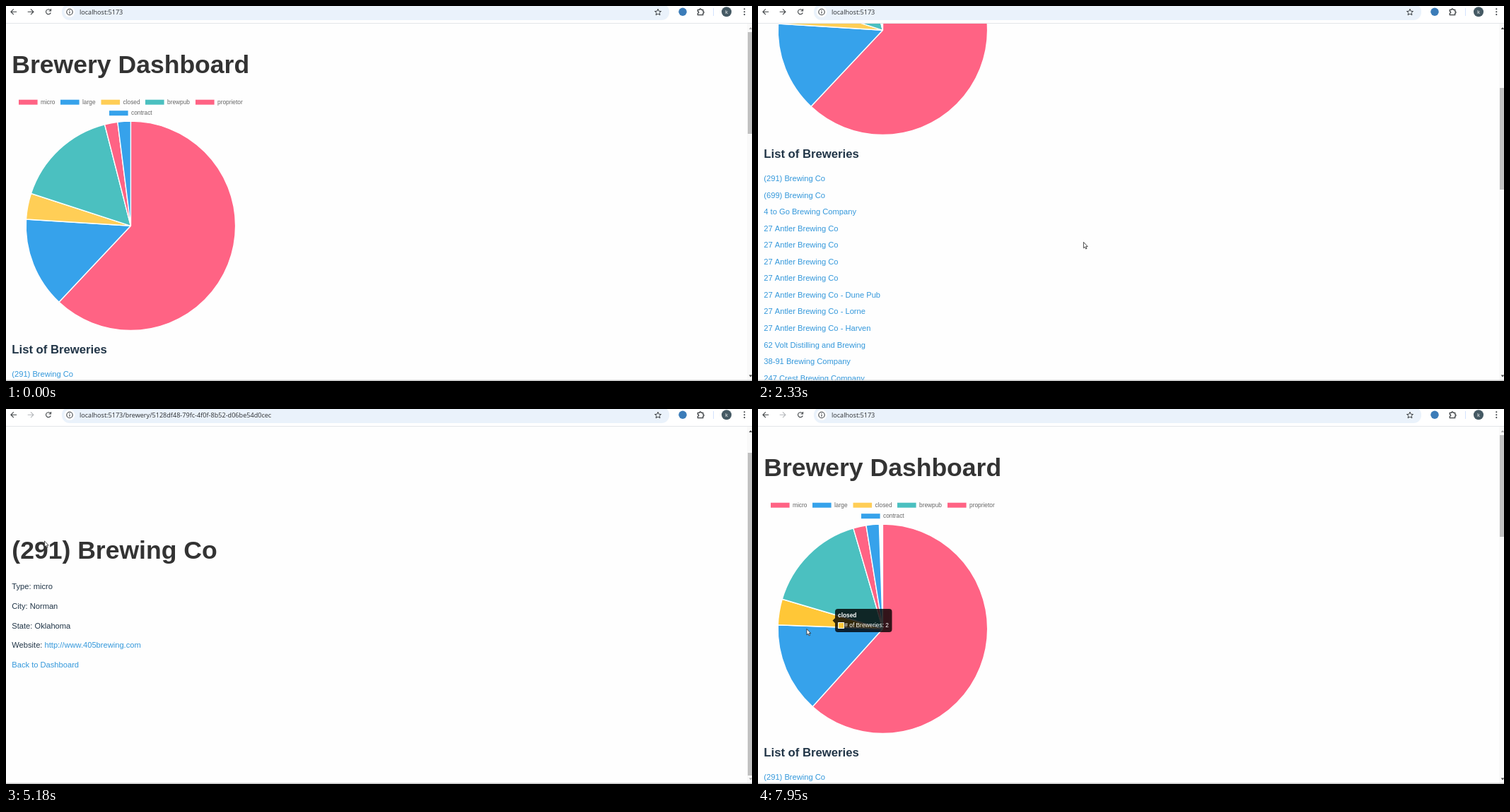
Animation, 1055 px wide and 531 px high, one loop 8000 ms. Source, as an HTML page with a canvas:

```html
<!DOCTYPE html>
<html lang="en">
<head>
<meta charset="utf-8">
<title>Brewery Dashboard</title>
<style>
html, body { margin: 0; width: 1055px; height: 531px; overflow: hidden; background: #fefefe; }
canvas { display: block; }
</style>
</head>
<body>
<canvas id="stage" width="1055" height="531"></canvas>
<script>
const ctx = document.getElementById('stage').getContext('2d');
const LOOP = 8000;
const SANS = '"Liberation Sans", Arial, sans-serif';
const UI = '"Open Sans", "Noto Sans", sans-serif';
const LEFT = 8.3, TITLE = 35.55, BODY = 11.15, ROW = 23.55;
const PINK = '#ff6384', BLUE = '#36a2eb', YELLOW = '#ffce56', TEAL = '#4bc0c0';
const INK = '#213547', LINK = '#3498db', HOVER = '#646cff';
const HOME = 'localhost:5173';
const DETAIL = HOME + '/brewery/5128df48-79fc-4f0f-8b52-d06be54d0cec';
const OPEN = 4390, BACK = 7200, CHART = 7222;

// label, count, colour, legend swatch x, legend row
const SLICES = [
  ['micro', 31, PINK, 18, 0], ['large', 7, BLUE, 77, 0], ['closed', 2, YELLOW, 134.5, 0],
  ['brewpub', 8, TEAL, 197, 0], ['proprietor', 1, PINK, 268, 0], ['contract', 1, BLUE, 146, 1]
];
const CHAIN = '27 Antler Brewing Co';
const BREWERIES = [
  '(291) Brewing Co', '(699) Brewing Co', '4 to Go Brewing Company',
  CHAIN, CHAIN, CHAIN, CHAIN,
  CHAIN + ' - Dune Pub', CHAIN + ' - Lorne', CHAIN + ' - Harven',
  '62 Volt Distilling and Brewing', '38-91 Brewing Company', '247 Crest Brewing Company',
  '386 Lane Brewing Co', '72X Brewing', '48th Artifact Brewing Company', '83 Hover Brewing Company'
];
// time, x, y of the pointer's hot spot
const PATH = [
  [640, 741, 442], [840, 460, 334], [3200, 460, 334], [3400, 300, 250], [3600, 95, 140],
  [3700, 72, 126], [3800, 70.5, 132.5], [5120, 70.5, 132.5], [5180, 54, 186], [5400, 60, 290],
  [5600, 66, 335], [5920, 71, 361], [5980, 71, 361], [6130, 77, 361], [6330, 68, 360],
  [6900, 68, 360], [6930, 71, 361], [7200, 71, 361], [7300, 71, 366], [7500, 71, 366], [7800, 68.5, 311]
];

const ramp = (t, a, b) => Math.min(1, Math.max(0, (t - a) / (b - a)));
const inOut = p => p < .5 ? 4 * p ** 3 : 1 - 4 * (1 - p) ** 3;
const outQuart = p => 1 - (1 - p) ** 4;

function pointer(t) {
  const i = PATH.findIndex(p => p[0] > t);
  if (i < 0) return PATH.at(-1).slice(1);
  const [a, b] = [PATH[i - 1], PATH[i]], p = ramp(t, a[0], b[0]);
  return [a[1] + (b[1] - a[1]) * p, a[2] + (b[2] - a[2]) * p];
}

function rect(x, y, w, h, color, radius = 0) {
  ctx.fillStyle = color;
  ctx.beginPath();
  ctx.roundRect(x, y, w, h, radius);
  ctx.fill();
}

function disc(x, y, r, color) {
  ctx.fillStyle = color;
  ctx.beginPath();
  ctx.arc(x, y, r, 0, 7);
  ctx.fill();
}

function text(str, x, y, size, color, family = SANS, weight = '') {
  ctx.font = `${weight} ${size}px ${family}`;
  ctx.fillStyle = color;
  ctx.fillText(str, x, y);
  return ctx.measureText(str).width;
}

function path(d, x, y, stroke, fill, width = 1.1) {
  ctx.save();
  ctx.translate(x, y);
  const shape = new Path2D(d);
  if (fill) { ctx.fillStyle = fill; ctx.fill(shape); }
  if (stroke) { ctx.strokeStyle = stroke; ctx.lineWidth = width; ctx.stroke(shape); }
  ctx.restore();
}

// Draws a link and tells whether the pointer is over it.
function link(str, x, y, mouse) {
  ctx.font = `${BODY}px ${SANS}`;
  const w = ctx.measureText(str).width;
  const over = !!mouse && mouse[0] > x && mouse[0] < x + w && mouse[1] > y - 10 && mouse[1] < y + 3;
  text(str, x, y, BODY, over ? HOVER : LINK);
  if (over) rect(x, y + 1, w, .8, HOVER);
  return over;
}

function pie(ease, grow, active) {
  const r = 148.2 + 15.8 * grow, cx = 176.4, cy = 459.5 - r;
  let from = -Math.PI / 2;
  ctx.strokeStyle = '#fff';
  ctx.lineWidth = 1.4;
  ctx.lineJoin = 'bevel';
  for (const [label, count, color] of SLICES) {
    const to = from + count / 50 * Math.PI * 2 * ease;
    ctx.fillStyle = label === active ? '#ffc737' : color;
    ctx.beginPath();
    ctx.moveTo(cx, cy);
    ctx.arc(cx, cy, r, from, to);
    ctx.closePath();
    ctx.fill();
    ctx.stroke();
    from = to;
  }
}

function tooltip(alpha) {
  ctx.globalAlpha = alpha;
  ctx.fillStyle = 'rgba(0,0,0,.8)';
  ctx.beginPath();
  ctx.roundRect(109, 283, 80.5, 33, 4);
  ctx.moveTo(109, 296);
  ctx.lineTo(105.5, 299.6);
  ctx.lineTo(109, 303.2);
  ctx.fill();
  text('closed', 113, 295, 8.36, '#fff', SANS, 'bold');
  rect(113, 302, 9, 9, '#fff');
  rect(114, 303, 7, 7, '#ffc737');
  text('# of Breweries: 2', 122.3, 309, 8.36, '#fff');
  ctx.globalAlpha = 1;
}

function dashboard(t, mouse) {
  const travel = 277 * inOut(ramp(t, 1700, 2330)) + 109 * inOut(ramp(t, 2580, 3040));
  const scroll = t > OPEN ? 0 : Math.floor(travel);
  const at = mouse && [mouse[0], mouse[1] + scroll];
  const ease = t < OPEN ? 1 : outQuart(ramp(t, CHART, CHART + 1000));
  const tip = ramp(t, 7740, 7900);
  let over = false;
  ctx.save();
  ctx.translate(0, -scroll);
  text('Brewery Dashboard', LEFT, 94.5, TITLE, '#333', SANS, 'bold');
  for (const [label, , color, x, row] of SLICES) {
    rect(x, 132.7 + row * 15.5, 26.6, 7, color);
    text(label, x + 31, 138.8 + row * 15.5, 8.36, '#666');
  }
  if (ease > 0) pie(ease, 1 - ease, tip > 0 && 'closed');
  text('List of Breweries', LEFT, 492, 16.7, INK, SANS, 'bold');
  BREWERIES.forEach((name, i) => { over = link(name, LEFT, 525 + i * ROW, at) || over; });
  if (tip) tooltip(tip);
  ctx.restore();
  scrollbar(37 + scroll * .285, 144, scroll > 0, true);
  return over;
}

function detail(mouse) {
  text(BREWERIES[0], LEFT, 212.3, TITLE, '#333', SANS, 'bold');
  ['Type: micro', 'City: Norman', 'State: Oklahoma'].forEach((line, i) => text(line, LEFT, 255.2 + i * 27.7, BODY, INK));
  const x = LEFT + text('Website: ', LEFT, 338.3, BODY, INK);
  const site = link('http://www.405brewing.com', x, 338.3, mouse);
  const back = link('Back to Dashboard', LEFT, 366, mouse);
  scrollbar(62, 457, true, false);
  return site || back;
}

function scrollbar(y, h, up, down) {
  const shade = on => on ? '#444' : '#a8a8a8';
  rect(1048, 25, 7, 505, '#f9f9f9');
  rect(1049, y, 6, h, '#c1c1c1');
  path('M-2.3 1.5L0-1.5L2.3 1.5Z', 1053, 31.5, null, shade(up));
  path('M-2.3-1.5L0 1.5L2.3-1.5Z', 1053, 524, null, shade(down));
}

function toolbar(url, canForward) {
  const dark = '#3c4043';
  rect(0, 0, 1055, 24, '#fff');
  rect(0, 24, 1055, 1, '#e3e5e8');
  rect(79, -3, 859, 23, '#eaf2fb', 11);
  path('M4.3 0H-3.8M0-3.9L-3.9 0L0 3.9', 10.8, 8.2, dark);
  path('M-4.3 0H3.8M0-3.9L3.9 0L0 3.9', 35, 8.2, canForward ? dark : '#b4b7ba');
  path('M3.3 1.3A3.5 3.5 0 1 1 2.6-2.4M3.5-4.2V-1.2H.6', 60, 8.2, dark);
  disc(90, 8.5, 7.5, '#fff');
  path('M4.2 0A4.2 4.2 0 1 1-4.2 0A4.2 4.2 0 1 1 4.2 0M0-.6V2.3M0-2.4V-1.3', 90, 8.5, dark);
  text(url, 104, 12, 9.11, '#2b2e31', UI);
  path('M0-4.5L1.3-1.5L4.5-1.3L2.1.8L2.9 4L0 2.3L-2.9 4L-2.1.8L-4.5-1.3L-1.3-1.5Z', 922, 8.8, dark, null, 1);
  disc(957, 8.3, 5.7, '#3b7cb8');
  path('M-4-3H-1.6A1.3 1.3 0 0 1 1-3H3.4V-.7A1.3 1.3 0 0 1 3.4 1.9V4.4H-4V2A1.4 1.4 0 0 0-4-.8Z', 982.3, 8.3, dark, null, 1.3);
  rect(1000, 3, 1, 11, '#d3e3fd');
  disc(1019, 8.2, 7, '#455a64');
  text('k', 1017, 11, 7.6, '#fff', UI);
  [4.3, 8.2, 12.1].forEach(y => disc(1044.3, y, 1.05, dark));
}

function status(url, alpha) {
  if (alpha <= 0) return;
  ctx.globalAlpha = alpha;
  ctx.font = `7.9px ${UI}`;
  rect(-4, 514.5, ctx.measureText(url).width + 7, 15.5, '#d3e3fd', [0, 3, 0, 0]);
  text(url, -2.6, 525.3, 7.9, '#3c4043', UI);
  ctx.globalAlpha = 1;
}

function drawPointer([x, y], hand) {
  if (hand) {
    path('M-1 7V1A1 1 0 0 1 1 1V5L4.8 5.8Q6 6.2 5.7 8L4.8 12.5H-.3L-3.2 8.7Q-3.3 7.2-2 7.3L-1 8.2Z', x, y, '#222', '#fff', .9);
  } else {
    path('M.4.4V8.8L2.3 7.1L3.6 10L5 9.4L3.8 6.6H6.2Z', x, y, '#222', '#fff', .8);
  }
}

function draw(now) {
  const t = now % LOOP;
  const mouse = t >= 640 ? pointer(t) : null;
  const onDetail = t >= OPEN && t < BACK;
  rect(0, 0, 1055, 531, '#fefefe');
  const over = onDetail ? detail(mouse) : dashboard(t, mouse);
  toolbar(onDetail ? DETAIL : HOME, t < OPEN);
  status(DETAIL, ramp(t, 3900, 4100) - ramp(t, 4680, 4840));
  status(HOME, ramp(t, 5960, 6160) - ramp(t, 7450, 7600));
  rect(0, 529.6, 1055, 1.4, '#c6c6c6');
  if (mouse) drawPointer(mouse, over);
  requestAnimationFrame(draw);
}
requestAnimationFrame(draw);
</script>
</body>
</html>
```
